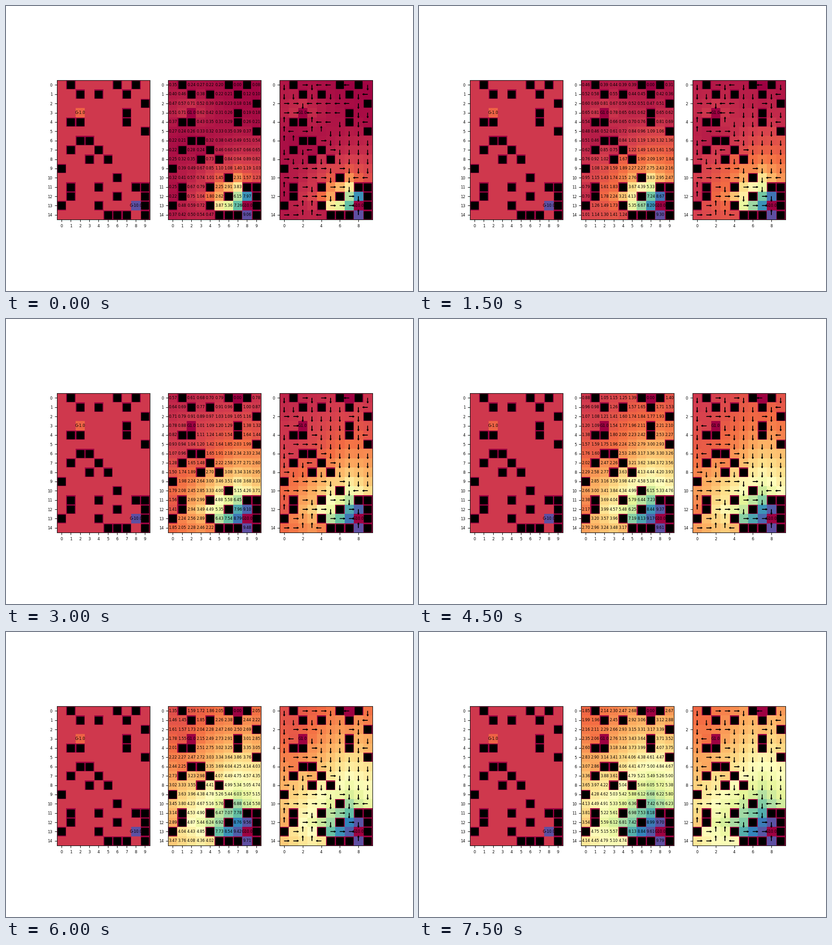
Animation, 894 px wide and 626 px high, one loop 8 s. Source, as a matplotlib script:

```python
import matplotlib.pyplot as plt
import numpy as np
from matplotlib.animation import FuncAnimation

DPI = 100
FONT = 6
GAMMA = 0.95
HOLD = 3  # ticks each solution stays on screen

MAZE = """
.#....#.#.
..#.#..#..
.........#
..a....#..
.##....#..
.........#
..##......
.#..#.....
...#.#....
#.........
......#...
.#..#...##
.#....#..#
#...#...Z#
.....###.#
""".split()
ROWS, COLS = len(MAZE), len(MAZE[0])
REWARDS = {"#": -1.0, "a": 1.0, "Z": 10.0}
MOVES = [(0, -1), (-1, 0), (0, 1), (1, 0)]  # left, up, right, down

reward = np.array([[REWARDS.get(c, 0.0) for c in row] for row in MAZE])
walls = [(r, c) for r in range(ROWS) for c in range(COLS) if reward[r, c] < 0]
goals = [(r, c) for r in range(ROWS) for c in range(COLS) if reward[r, c] > 0]
cells = [(r, c) for r in range(ROWS) for c in range(COLS) if reward[r, c] == 0]


def step(cell, move):
    r, c = cell[0] + move[0], cell[1] + move[1]
    inside = 0 <= r < ROWS and 0 <= c < COLS
    return (r, c) if inside and reward[r, c] >= 0 else cell


# Row and column of the square reached from every free cell by every move
reach = np.array([[step(cell, m) for m in MOVES] for cell in cells])
to_r, to_c = reach[..., 0], reach[..., 1]
at_r, at_c = np.array(cells).T


def solve(eps):
    """Values and greedy moves when a share eps of the steps goes astray."""
    value = np.zeros((ROWS, COLS))
    for _ in range(600):
        q = reward[to_r, to_c] + GAMMA * value[to_r, to_c]
        value[at_r, at_c] = (1 - eps) * q.max(axis=1) + eps * q.mean(axis=1)
    return value, q.argmax(axis=1)


solutions = [solve(0.9 - 0.1 * k) for k in range(6)]

plt.rcParams.update({"font.family": "DejaVu Sans", "font.size": FONT,
                     "xtick.labelsize": FONT, "ytick.labelsize": FONT})
fig, (ax_reward, ax_value, ax_policy) = plt.subplots(
    1, 3, figsize=(8.94, 6.26), dpi=DPI)


def label(ax, cell, text=""):
    return ax.text(cell[1], cell[0], text, ha="center", va="center")


def panel(ax, data, goal_text):
    image = ax.imshow(data, cmap="Spectral")
    wall_r, wall_c = np.array(walls).T
    ax.plot(wall_c, wall_r, "ks", markersize=11.3)
    ax.set_xlim(-0.5, COLS - 0.5)
    ax.set_ylim(ROWS - 0.5, -0.5)
    for cell in goals:
        label(ax, cell, goal_text.format(reward[cell]))
    return image


panel(ax_reward, reward, "G-{}")
value_image = panel(ax_value, solutions[0][0], "G{}")
policy_image = panel(ax_policy, solutions[0][0], "G{}")
for ax in (ax_reward, ax_value):
    ax.set_xticks(range(COLS))
    ax.set_yticks(range(ROWS))
ax_policy.set_xticks(range(0, COLS, 2))
ax_policy.set_yticks(range(0, ROWS, 2))

numbers = [label(ax_value, cell) for cell in cells]
arrows = []


def update(tick):
    value, best = solutions[tick // HOLD]
    for image in (value_image, policy_image):
        image.set_data(value)
        image.set_clim(0, value.max())
    for text, cell in zip(numbers, cells):
        text.set_text(f"{value[cell]:.2f}")
    while arrows:
        arrows.pop().remove()
    for (r, c), move in zip(cells, best):
        dy, dx = MOVES[move]
        arrows.append(ax_policy.arrow(
            c, r, 0.4 * dx, 0.4 * dy, head_width=0.15, head_length=0.15,
            color="black", linewidth=1))


anim = FuncAnimation(fig, update, frames=16, interval=500, repeat=True,
                     repeat_delay=0)
plt.show()
```
